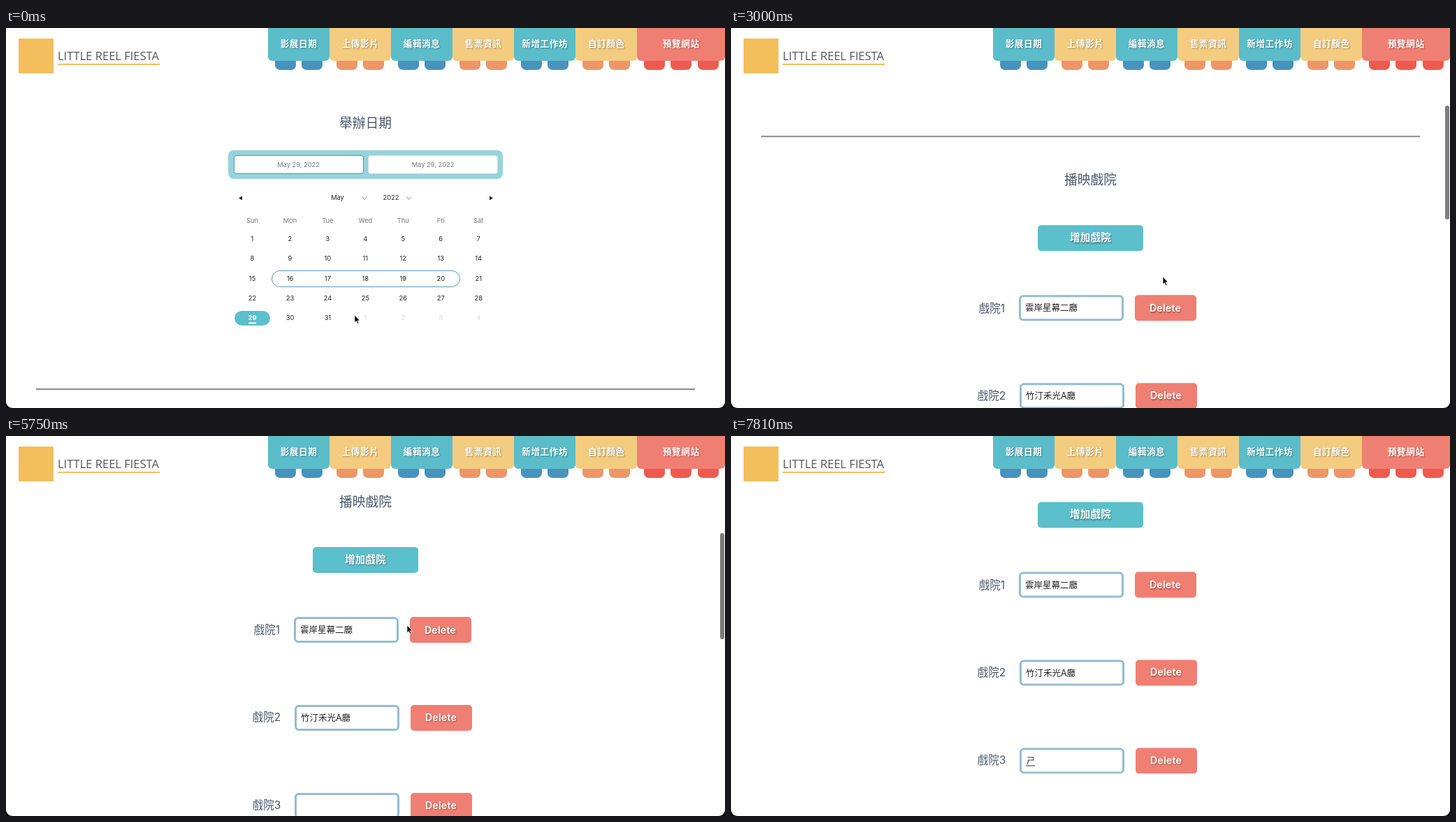
Recreate the animation shown at these times as an HTML page. Size 1029x544 px, loop 8000 ms.

```html
<!DOCTYPE html>
<html lang="zh-Hant">
<head>
<meta charset="utf-8">
<title>影展設定</title>
<style>
@property --scroll { syntax: "<number>"; inherits: true; initial-value: 0; }
@property --ratio { syntax: "<number>"; inherits: true; initial-value: .307; }

html, body { margin: 0; width: 100%; height: 100%; overflow: hidden; background: #fff; }
body { font: 9.3px/1 Inter, "Noto Sans CJK TC", "Noto Sans CJK", sans-serif; color: #222; }
#stage, #stage * { box-sizing: border-box; animation-duration: 8s; animation-iteration-count: infinite; animation-timing-function: linear; }
#stage { position: relative; width: 1029px; height: 544px; overflow: hidden; background: #fff; animation-name: scroll, ratio; }
#stage div, #stage svg { position: absolute; }
#stage .t { transform: translate(-50%, -50%); white-space: nowrap; }
#stage .step { animation-timing-function: step-end; }

/* Header */
#header { left: 0; top: 0; width: 1029px; height: 81px; background: #fff; }
#mark { left: 18px; top: 15px; width: 50px; height: 50px; background: #f3bf5c; }
#brand { left: 74px; top: 30px; font: 16.5px/20px "Open Sans", sans-serif; color: #555; white-space: nowrap; }
#brandLine { left: 74px; top: 51px; width: 146px; height: 2px; background: #f3bf5c; }
.tab { top: 0; height: 47px; border-radius: 0 0 6px 6px; background: var(--main); }
.flap { top: 44px; width: 30px; height: 16px; border-radius: 0 0 7px 7px; background: var(--dark); }
.tab .t { left: 50%; top: 23px; font-size: 12.6px; letter-spacing: .6px; }
.tab .t, .button { color: #fff; font-weight: 600; text-shadow: 1px 1.5px 2px rgba(0,0,0,.35); }

/* Page */
#page { left: 0; top: 0; width: 1029px; height: 1947px; transform: translateY(calc(var(--scroll) * -1px)); }
.title { left: 514.5px; font-size: 18.75px; color: #4a5568; }
.rule { left: 43px; width: 943px; height: 1.4px; background: #8a8a8a; }
#range { left: 318px; top: 175px; width: 393px; height: 41px; border-radius: 8px; background: #95d3dc; }
.date { top: 7px; width: 186px; height: 27px; border: 1px solid #c5dfe4; border-radius: 4px; background: #fff; color: #777; }
.date .t { left: 50%; top: 50%; }
#from { left: 7.5px; animation-name: focusFrom; }
#to { left: 200px; animation-name: focusTo; }
.first { animation-name: first; }
.second { animation-name: second; }
.third { animation-name: third; }
.head { color: #777; }
.next { color: #d9d9d9; }
#ring { left: 379.5px; top: 347px; width: 270px; height: 23.5px; border: 1px solid #5a9bbb; border-radius: 12px; }
#fill { left: 381.5px; top: 349px; height: 19.5px; border-radius: 10px; background: #63c1cd; color: #fff; overflow: hidden; animation-name: fillIn, fillWidth; animation-timing-function: linear, step-end; }
.today { left: 352.5px; top: 415px; font-weight: 700; }
.today::after { content: ""; position: absolute; left: 0; right: 0; top: 11px; height: 1.5px; background: #4a8fc0; }
#pill { left: 327px; top: 405px; width: 51px; height: 20.5px; border-radius: 10.5px; background: #5bbfcc; color: #fff; animation-name: pillOut; }
#pill .today { left: 25.5px; top: 10px; }
#pill .today::after { background: #fff; }
#add { left: 439px; top: 643.5px; width: 151px; height: 37.5px; border-radius: 5px; background: #5bbfcc; }
.button .t { left: 50%; top: 50%; }
#add .t { font-size: 14.5px; letter-spacing: .3px; }
.row { left: 0; width: 1029px; height: 37px; }
.label { left: 373.5px; top: 50%; font-size: 15.5px; color: #4a5568; }
.field { left: 412px; width: 150px; height: 37px; border: 3px solid #93bdd0; border-radius: 6px; font-size: 12.5px; line-height: 32px; padding-left: 6px; white-space: nowrap; }
.delete { left: 577.5px; width: 88px; height: 37px; border-radius: 5px; background: #f07f73; }
.delete .t { font-size: 14.2px; letter-spacing: .2px; }
#row3 { animation-name: rowIn; }
#typed { left: 6.5px; top: 0; animation-name: typed; text-decoration: underline; text-underline-offset: 2px; }
#caret { left: 6px; top: 8px; width: 1px; height: 15px; background: #333; animation-name: caret; }
#endRule { animation-name: ruleDown; }

#thumb { left: 1022px; top: 0; width: 6px; border-radius: 3px; background: #7d7d7d; transform: translateY(calc(var(--scroll) * var(--ratio) * 1px)); animation-name: thumb, thumbSize; animation-timing-function: linear, step-end; }
#cursor { left: 0; top: 0; animation-name: move; }
#cursor svg { left: 0; top: 0; width: 1px; height: 1px; overflow: visible; }
#arrow { animation-name: arrow; }
#hand { animation-name: hand; }
#beam { animation-name: beam; }
#corners { inset: 0; border-radius: 0 0 9px 9px; box-shadow: 0 0 0 20px #000; }

@keyframes scroll {
  0%, 25.9% { --scroll: 0; }
  27.4% { --scroll: 14; }
  29.75% { --scroll: 72; }
  32.5% { --scroll: 178; }
  35% { --scroll: 282; }
  37.5% { --scroll: 361.5; }
  40% { --scroll: 408; }
  43% { --scroll: 439; }
  46.1% { --scroll: 454; }
  50.75%, 68.1% { --scroll: 460; }
  70% { --scroll: 470; }
  71.875% { --scroll: 485; }
  75% { --scroll: 506; }
  77.375% { --scroll: 520.5; }
  80% { --scroll: 538; }
  82.9%, 100% { --scroll: 549.5; }
}
@keyframes ratio { 0%, 63.2% { --ratio: .307; } 63.21%, 100% { --ratio: .2864; } }
@keyframes thumb {
  0%, 25.9% { opacity: 0; }
  26.5%, 55.5% { opacity: 1; }
  59%, 68.2% { opacity: 0; }
  69%, 86% { opacity: 1; }
  89.5%, 100% { opacity: 0; }
}
@keyframes thumbSize { 0% { height: 162.5px; } 63.2%, 100% { height: 152px; } }
@keyframes move {
  0% { transform: translate(499px, 411px); }
  .75% { transform: translate(485px, 402px); }
  1.6%, 4.6% { transform: translate(416px, 370px); }
  4.7%, 15.2% { transform: translate(404px, 362px); animation-timing-function: ease-in-out; }
  23%, 55.2% { transform: translate(618px, 356px); animation-timing-function: ease-in-out; }
  61%, 63.5% { transform: translate(556px, 205px); animation-timing-function: ease-in-out; }
  68%, 83.4% { transform: translate(574px, 271px); animation-timing-function: ease-in-out; }
  90%, 100% { transform: translate(465px, 463px); }
}
@keyframes arrow { 0% { opacity: 1; } 1.5% { opacity: 0; } 32.5% { opacity: 1; } 59% { opacity: 0; } 65% { opacity: 1; } 89%, 100% { opacity: 0; } }
@keyframes hand { 0% { opacity: 0; } 1.5% { opacity: 1; } 32.5% { opacity: 0; } 59% { opacity: 1; } 65%, 100% { opacity: 0; } }
@keyframes beam { 0% { opacity: 0; } 89% { opacity: 1; } 96.1%, 100% { opacity: 0; } }
@keyframes focusFrom { 0% { border-color: #4b93c9; } 10.1% { border-color: #c5dfe4; } 23.5%, 100% { border-color: #4b93c9; } }
@keyframes focusTo { 0% { border-color: #c5dfe4; } 10.1% { border-color: #4b93c9; } 23.5%, 100% { border-color: #c5dfe4; } }
@keyframes first { 0% { opacity: 1; } 10.1%, 100% { opacity: 0; } }
@keyframes second { 0% { opacity: 0; } 10.1% { opacity: 1; } 23.5%, 100% { opacity: var(--keep, 0); } }
@keyframes third { 0% { opacity: 0; } 23.5%, 100% { opacity: 1; } }
@keyframes pillOut { 0%, 10.1% { opacity: 1; } 13.2%, 100% { opacity: 0; } }
@keyframes fillIn { 0%, 10.1% { opacity: 0; } 13.2%, 100% { opacity: 1; } }
@keyframes fillWidth { 0% { width: 51px; } 17.2% { width: 105px; } 18.6% { width: 159px; } 19.7% { width: 213px; } 21.1%, 100% { width: 266.5px; } }
@keyframes rowIn { 0% { opacity: 0; } 63.2%, 100% { opacity: 1; } }
@keyframes ruleDown { 0% { top: 970.5px; } 63.2%, 100% { top: 1096px; } }
@keyframes caret { 0% { opacity: 0; } 90.6% { opacity: 1; } 96.1%, 100% { opacity: 0; } }
@keyframes typed { 0% { opacity: 0; } 96.1%, 100% { opacity: 1; } }
</style>
</head>
<body>
<div id="stage">
  <div id="page">
    <div class="t title" style="top:137px">舉辦日期</div>
    <div id="range">
      <div id="from" class="date step">
        <div class="t step first">May 29, 2022</div>
        <div class="t step second" style="--keep:1">May 16, 2022</div>
      </div>
      <div id="to" class="date step">
        <div class="t step first">May 29, 2022</div>
        <div class="t step second">May 16, 2022</div>
        <div class="t step third">May 20, 2022</div>
      </div>
    </div>
    <svg style="left:318px;top:230px" width="393" height="26">
      <path d="M15 13.5l5-3v6zM379 13.5l-5-3v6z" fill="#222"/>
      <path d="M191.5 11.5l3.5 4 3.5-4M255 11.5l3.5 4 3.5-4" fill="none" stroke="#888"/>
    </svg>
    <div class="t" style="left:474.5px;top:243px">May</div>
    <div class="t" style="left:551px;top:243px">2022</div>
    <div id="calendar"></div>
    <div id="ring"></div>
    <div id="fill"></div>
    <div class="t today">29</div>
    <div id="pill"><div class="t today">29</div></div>
    <div class="rule" style="top:516.3px"></div>
    <div class="t title" style="top:580px">播映戲院</div>
    <div id="add" class="button"><div class="t">增加戲院</div></div>
    <div id="rows"></div>
    <div id="endRule" class="rule step"></div>
  </div>
  <div id="header">
    <div id="mark"></div>
    <div id="brand">LITTLE REEL FIESTA</div>
    <div id="brandLine"></div>
    <div id="tabs"></div>
  </div>
  <div id="thumb"></div>
  <div id="cursor">
    <svg id="arrow" class="step"><path d="M0 0V11L2.6 8.7 4.3 12.6 6.1 11.8 4.4 8H7.6Z" fill="#000" stroke="#fff" stroke-width=".8"/></svg>
    <svg id="hand" class="step"><path d="M1 2c0-1.6 2-1.6 2.2 0l.5 3 4 .8c1.2.3 1.5 1 1.3 2.2l-.6 4.5H3.2L-1.8 8c-.6-1 .5-1.7 1.4-1L1.6 8.2zM4 9v2M6 9v2" fill="#fff" stroke="#000"/></svg>
    <svg id="beam" class="step"><path d="M-2.5-6.5Q0-6.5 0-5V5Q0 6.5-2.5 6.5M2.5-6.5Q0-6.5 0-5M0 5Q0 6.5 2.5 6.5" fill="none" stroke="#333"/></svg>
  </div>
  <div id="corners"></div>
</div>
<script>
const $ = id => document.getElementById(id);
const text = (x, y, content, cls = "") =>
  `<div class="t ${cls}" style="left:${x}px;top:${y}px">${content}</div>`;
const COL = 53.95, ROW = 28.25;

const palettes = [["#5bbdca", "#4992bb"], ["#f4cc80", "#eb9769"], ["#f07f73", "#ef5a50"]];
const tabs = ["影展日期", "上傳影片", "編輯消息", "售票資訊", "新增工作坊", "自訂顏色", "預覽網站"];
$("tabs").innerHTML = tabs.map((name, i) => {
  const last = i === tabs.length - 1;
  const left = 375 + i * 88.05;
  const [main, dark] = palettes[last ? 2 : i % 2];
  const flaps = Array.from({ length: last ? 3 : 2 }, (_, k) =>
    `<div class="flap" style="left:${left + 9.8 + k * 38.2}px;--dark:${dark}"></div>`).join("");
  return flaps + `<div class="tab" style="left:${left}px;width:${last ? 126 : 88.05}px;--main:${main}"><div class="t">${name}</div></div>`;
}).join("");

const weekdays = ["Sun", "Mon", "Tue", "Wed", "Thu", "Fri", "Sat"];
let calendar = weekdays.map((day, i) => text(352.5 + i * COL, 276, day, "head")).join("");
for (let i = 0; i < 35; i++) {
  if (i === 28) continue;
  const x = 352.5 + i % 7 * COL, y = 302 + Math.floor(i / 7) * ROW;
  calendar += text(x, y, i < 31 ? i + 1 : i - 30, i < 31 ? "" : "next");
}
$("calendar").innerHTML = calendar;
$("fill").innerHTML = [16, 17, 18, 19, 20].map((day, i) => text(25 + i * COL, 9.5, day)).join("");

const theatres = [
  "雲岸星幕二廳",
  "竹汀禾光A廳",
  '<div id="typed" class="step">ㄕ</div><div id="caret" class="step"></div>'
];
$("rows").innerHTML = theatres.map((name, i) =>
  `<div class="row step" id="row${i + 1}" style="top:${744.2 + i * 125.7}px;left:${i ? 1 : 0}px">
    <div class="t label" style="margin-left:${i ? -1.5 : 0}px">戲院${i + 1}</div>
    <div class="field">${name}</div>
    <div class="button delete"><div class="t">Delete</div></div>
  </div>`).join("");
</script>
</body>
</html>
```
